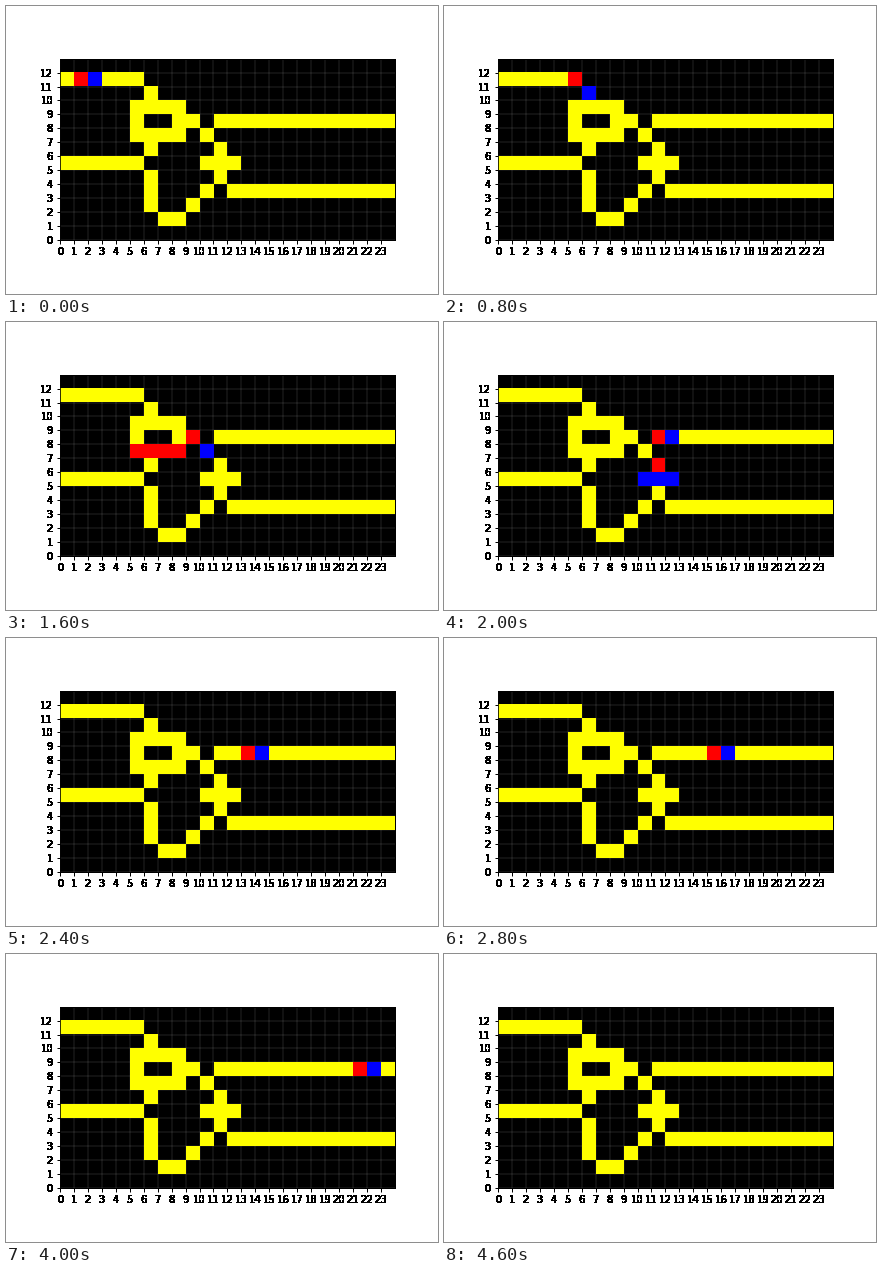
These frames come from a looping animation (432 px wide and 288 px high, 8 s). A matplotlib script:

```python
import numpy as np
import matplotlib.pyplot as plt
from matplotlib.animation import FuncAnimation
from matplotlib.colors import ListedColormap

COLS, ROWS = 24, 13
STEPS, STEP_MS = 40, 200
EMPTY, WIRE, HEAD, TAIL = range(4)


def lay(grid, *corners):
    """Lay wire through the corners, straight or diagonally."""
    for (x0, y0), (x1, y1) in zip(corners, corners[1:]):
        n = max(abs(x1 - x0), abs(y1 - y0))
        xs = np.linspace(x0, x1, n + 1).astype(int)
        ys = np.linspace(y0, y1, n + 1).astype(int)
        grid[ys, xs] = WIRE


def start():
    grid = np.full((ROWS, COLS), EMPTY)
    end = COLS - 1
    lay(grid, (0, 11), (5, 11), (6, 10))                    # upper input
    lay(grid, (0, 5), (5, 5))                               # lower input
    lay(grid, (5, 9), (8, 9), (8, 7), (5, 7), (5, 9))       # ring
    lay(grid, (9, 8), (11, 6), (11, 4), (8, 1), (7, 1), (6, 2), (6, 6))
    lay(grid, (10, 5), (12, 5))                             # crossbar
    lay(grid, (11, 8), (end, 8))                            # outputs
    lay(grid, (12, 3), (end, 3))
    grid[5, 6] = EMPTY                                      # gap at lower input
    grid[11, 1], grid[11, 2] = TAIL, HEAD
    return grid


def step(grid):
    """Advance the Wireworld automaton by one generation."""
    heads = np.pad(grid == HEAD, 1).astype(int)
    near = sum(heads[dy:dy + ROWS, dx:dx + COLS]
               for dy in range(3) for dx in range(3))
    new = grid.copy()
    new[grid == HEAD] = TAIL
    new[grid == TAIL] = WIRE
    new[(grid == WIRE) & ((near == 1) | (near == 2))] = HEAD
    return new


def solid(img, dpi):
    """Make every touched pixel of a label opaque."""
    img = img.copy()
    img[..., 3] = img[..., 3] > 0
    return img, 0, 0


def show(ax, grid, colors, zorder):
    return ax.imshow(grid, cmap=ListedColormap(colors), vmin=EMPTY, vmax=TAIL,
                     origin="lower", interpolation="nearest",
                     extent=(0, COLS, 0, ROWS), zorder=zorder)


states = [start()]
while len(states) < STEPS:
    states.append(step(states[-1]))

plt.rcParams.update({"font.family": "DejaVu Sans", "font.size": 10})
fig, ax = plt.subplots(figsize=(6, 4), dpi=72, facecolor="white")
fig.subplots_adjust(left=0.125, right=0.9, bottom=0.125, top=0.88)

# Black board, grid lines, then the wires on top
show(ax, np.zeros((ROWS, COLS)), ["black"] * 4, 0)
image = show(ax, states[0], ["none", "yellow", "blue", "red"], 2)
ax.set(xticks=range(COLS), yticks=range(ROWS))
ax.grid(color="white", linewidth=0.14)
ax.tick_params(width=1)
ax.spines[["top", "right", "bottom"]].set_linewidth(1)
for label in ax.get_xticklabels() + ax.get_yticklabels():
    label.set_agg_filter(solid)


def draw(i):
    image.set_data(states[i])
    return [image]


anim = FuncAnimation(fig, draw, frames=STEPS, interval=STEP_MS,
                     init_func=lambda: draw(0), repeat=True, repeat_delay=0)
plt.show()
```
